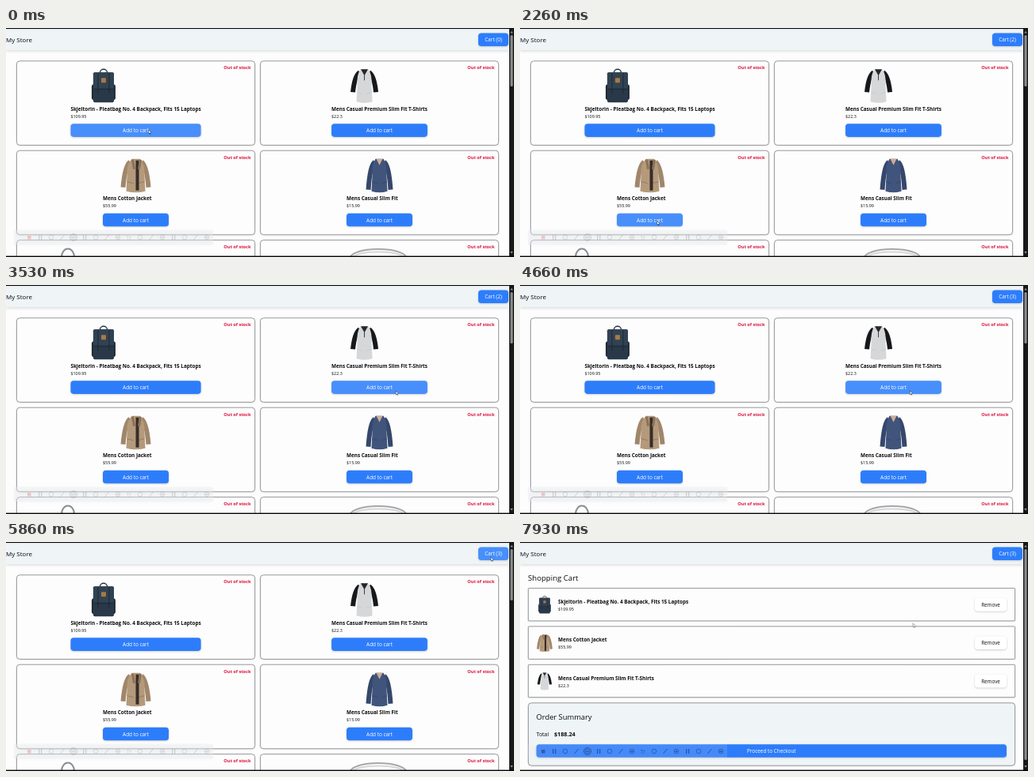
Write an HTML page with a canvas that moves like this. It is 640 by 290 pixels and loops after 8 s.

```html
<!DOCTYPE html>
<html lang="en">
<head>
<meta charset="utf-8">
<title>My Store</title>
<style>
html, body { margin: 0; width: 100%; height: 100%; overflow: hidden; background: #fdfdfd; }
canvas { display: block; width: 640px; height: 290px; }
</style>
</head>
<body>
<canvas id="stage"></canvas>
<script>
const LOOP = 8000;
const canvas = document.getElementById('stage');
const c = canvas.getContext('2d');
const dpr = Math.max(1, window.devicePixelRatio || 1);
canvas.width = 640 * dpr;
canvas.height = 290 * dpr;

const INK = '#0c0d0f', LINE = '#6c6f72', PALE = '#eff4f7', PAGE = '#fdfdfd';
const BLUE = '#2d7dfb', HOVER = '#488ffb', RED = '#dc1038';
const CLICKS = [660, 2260, 4060], CHECKOUT = 6260;

// the pointer rests, then glides to each place
const moves = [
  { from: 660, to: 1200, x: 179, y: 137.4 },
  { from: 1200, to: 1930, x: 172.5, y: 244.5 },
  { from: 2460, to: 3530, x: 491, y: 134 },
  { from: 4660, to: 5930, x: 614, y: 16 },
  { from: 6800, to: 7930, x: 495, y: 103 }
];

function pointerAt(t) {
  const p = { x: 179.5, y: 129, over: false };
  for (const m of moves) {
    const u = Math.min(1, Math.max(0, (t - m.from) / (m.to - m.from)));
    const e = 1 - (1 - u) ** 1.25;
    p.x += (m.x - p.x) * e;
    p.y += (m.y - p.y) * e;
  }
  return p;
}

function rect(x, y, w, h, fill) {
  c.fillStyle = fill;
  c.fillRect(x, y, w, h);
}

function box(x, y, w, h, r, fill, stroke, shadow) {
  c.save();
  c.beginPath();
  c.roundRect(x, y, w, h, r);
  if (shadow) {
    c.shadowColor = `rgba(0,0,0,${shadow})`;
    c.shadowBlur = 2.4 * dpr;
    c.shadowOffsetY = 0.8 * dpr;
  }
  c.fillStyle = fill;
  c.fill();
  c.restore();
  if (stroke) {
    c.strokeStyle = stroke;
    c.lineWidth = 0.7;
    c.stroke();
  }
}

function setFont(size, weight = 400) {
  c.font = `${weight} ${size}px "Open Sans", "Noto Sans", sans-serif`;
}

function text(s, x, y, size, color = INK, weight = 400, align = 'left') {
  setFont(size, weight);
  c.textAlign = align;
  c.fillStyle = color;
  c.fillText(s, x, y);
}

function line(color, w, ...p) {
  c.beginPath();
  for (let i = 0; i < p.length; i += 2) c.lineTo(p[i], p[i + 1]);
  c.strokeStyle = color;
  c.lineWidth = w;
  c.stroke();
}

function ring(x, y, rx, ry, color, w) {
  c.beginPath();
  c.ellipse(x, y, rx, ry, 0, 0, Math.PI * 2);
  c.strokeStyle = color;
  c.lineWidth = w;
  c.stroke();
}

// a triangle pointing up (h > 0) or down (h < 0)
function wedge(x, y, w, h, fill) {
  c.beginPath();
  c.moveTo(x, y);
  c.lineTo(x + w, y + h);
  c.lineTo(x - w, y + h);
  c.fillStyle = fill;
  c.fill();
}

function backpack() {
  ring(0, -17, 4.5, 4, '#26313f', 1.4);
  box(-15, -2, 30, 20, 3, '#1f2b38');
  box(-13, -17, 26, 38, 2, '#2a394a');
  box(-13, -17, 26, 20, 2, '#314253');
  for (const x of [-7, 7]) line('#1d2834', 1, x, -16, x, 10);
  rect(-12, 4, 24, 1, '#1d2834');
  box(-3, -10, 6, 6, 1, '#a87a45');
}

// sleeves are thick curves from the shoulders, the body tapers to a hem
function garment({ body, sleeve, half, reach, cuff, seam }) {
  c.lineCap = 'butt';
  for (const s of [-1, 1]) {
    c.beginPath();
    c.moveTo(s * half * 0.6, -17);
    c.quadraticCurveTo(s * reach * 0.85, -13, s * reach, cuff);
    c.strokeStyle = sleeve;
    c.lineWidth = 6;
    c.stroke();
  }
  c.beginPath();
  c.moveTo(-5, -21);
  c.lineTo(5, -21);
  c.quadraticCurveTo(half, -14, half - 1, 0);
  c.lineTo(half, 20);
  c.quadraticCurveTo(0, 23, -half, 20);
  c.lineTo(1 - half, 0);
  c.quadraticCurveTo(-half, -14, -5, -21);
  c.fillStyle = body;
  c.fill();
  for (const s of [-1, 1]) line(seam, 0.8, s * half * 0.9, 8, s * 3, 10);
}

function raglan() {
  garment({ body: '#d6d7d9', sleeve: '#17181b', half: 10, reach: 14.5, cuff: 8, seam: '#c6c7c9' });
  wedge(0, -13, 4.5, -8, '#26272b');
  line('#3a3c40', 1, 0, -14, 0, -7);
}

function jacket() {
  garment({ body: '#b49a7b', sleeve: '#a0866a', half: 12, reach: 16, cuff: 15, seam: '#8d7459' });
  line('#362c2a', 4, 2, -19, 2, 19);
  for (const s of [-1, 1]) line('#8b7258', 3, 1 + s * 5, -20, 1 + s * 3, -8);
}

function slimShirt() {
  garment({ body: '#40547c', sleeve: '#35476b', half: 10, reach: 14, cuff: 18, seam: '#344668' });
  wedge(0, -13, 4, -8, '#d0ad95');
}

const products = [
  { name: 'Skjeltorin - Pleatbag No. 4 Backpack, Fits 15 Laptops', price: '$109.95', art: backpack },
  { name: 'Mens Casual Premium Slim Fit T-Shirts', price: '$22.3', art: raglan },
  { name: 'Mens Cotton Jacket', price: '$55.99', art: jacket },
  { name: 'Mens Casual Slim Fit', price: '$15.99', art: slimShirt }
];

function label(item, x, y) {
  text(item.name, x, y, 6.35, INK, 700);
  text(item.price, x, y + 9.2, 5.4);
}

function picture(item, x, y, k) {
  c.save();
  c.translate(x, y);
  c.scale(k, k);
  item.art();
  c.restore();
}

function button(caption, x, y, w, p) {
  const h = 16.6;
  const over = p.x >= x && p.x <= x + w && p.y >= y && p.y <= y + h;
  p.over ||= over;
  box(x, y, w, h, 3.8, over ? HOVER : BLUE, null, 0.2);
  text(caption, x + w / 2, y + 10.8, 6.4, '#fff', 400, 'center');
}

function header(count, p) {
  c.save();
  c.shadowColor = 'rgba(0,0,0,.16)';
  c.shadowBlur = 4 * dpr;
  c.shadowOffsetY = dpr;
  rect(0, 0, 634, 28, PALE);
  c.restore();
  text('My Store', 0, 18, 8);
  button(`Cart (${count})`, 595, 6.4, 38, p);
}

// each card's column is as wide as its title, but never under 83
function store(p) {
  for (let i = 0; i < 6; i++) {
    const x = 13.4 + 307 * (i % 2), y = 41.8 + 113.4 * (i >> 1);
    box(x, y, 300.2, 106.6, 4, PAGE, LINE, 0.1);
    text('Out of stock', x + 295, y + 10.4, 5.6, RED, 700, 'right');
    const item = products[i];
    if (!item) continue;
    setFont(6.35, 700);
    const w = Math.max(83, c.measureText(item.name).width);
    const left = x + 150.1 - w / 2;
    picture(item, left + 41.5, y + 31.5, 1);
    label(item, left, y + 63);
    button('Add to cart', left, y + 79.5, w, p);
  }
  ring(78, 290, 8, 10.5, '#8d8f91', 2);
  ring(469, 291, 35, 11, '#a5a7a9', 2);
  ring(469, 291.5, 32, 8, '#d6d7d9', 2);
}

function cart(p) {
  text('Shopping Cart', 10, 48.7, 9.6);
  [0, 2, 1].forEach((id, i) => {
    const y = 58.5 + 48.4 * i;
    box(10.4, y, 613.2, 41.4, 0.8, PAGE, LINE, 0.1);
    picture(products[id], 31, y + 21, 0.52);
    label(products[id], 48, y + 19.2);
    box(573, y + 12.6, 40, 16.6, 3.8, '#fff', null, 0.2);
    text('Remove', 593, y + 23.3, 6.3, INK, 400, 'center');
  });
  box(10.4, 203.8, 613.2, 79.4, 4, PALE, LINE, 0.1);
  text('Order Summary', 20.5, 224.6, 9.35);
  text('Total', 20.5, 245.6, 7);
  text('$188.24', 43, 245.6, 7.2, INK, 700);
  button('Proceed to Checkout', 20.6, 256.2, 592.4, p);
}

// faint floating recorder bar with evenly spaced tools
function toolbar(inCart) {
  c.save();
  box(10, 255.5, 251, 19, 2, `rgba(235,238,242,${inCart ? 0.13 : 0.4})`, null, 0.08);
  c.globalAlpha = inCart ? 0.55 : 0.22;
  const ink = inCart ? '#0f2c62' : '#55585c', y = 265;
  for (let i = 0; i < 17; i++) {
    const x = 29 + 14 * i, kind = i % 4;
    if (i === 0) rect(x - 2, y - 2, 4.5, 4.5, inCart ? '#3a2b62' : '#e02626');
    else if (i === 9) text('Tr', x, y + 2.5, 7, ink, 400, 'center');
    else if (kind === 1) for (const d of [-2, 1]) rect(x + d, y - 3, 1.3, 6, ink);
    else if (kind === 3) line(ink, 1, x - 2.5, y + 3, x + 2.5, y - 3);
    else {
      ring(x, y, 2.8, 2.8, ink, 0.8);
      if (kind === 0) rect(x - 1.5, y - 0.5, 3, 1.5, ink);
    }
  }
  ring(85, y, 4.5, 4.5, ink, 1);
  c.restore();
}

function frameEdges(inCart) {
  rect(0, 0, 640, 1.1, '#050607');
  rect(634, 0, 6, 290, '#17181a');
  box(635.4, 9, 3.2, inCart ? 267 : 65, 1.5, '#8c8e90');
  wedge(637, 3.8, 1.8, 2.7, '#8c8e90');
  wedge(637, 285.7, 1.8, -2.7, '#8c8e90');
  rect(0, 288.6, 640, 1.4, '#050607');
}

function pointer({ x, y, over }) {
  c.save();
  c.translate(x, y);
  c.lineJoin = 'round';
  c.beginPath();
  c.moveTo(0, 0);
  c.lineTo(0.3, 4.8);
  c.lineTo(1.6, 3.9);
  c.lineTo(3.6, 3.4);
  c.closePath();
  c.fillStyle = '#fff';
  c.fill();
  line(over ? '#1c2433' : '#55575a', 0.8, 1.6, 3.9, 2.4, 5.6);
  c.beginPath();
  c.moveTo(0, 0);
  c.lineTo(0.3, 4.8);
  c.lineTo(3.6, 3.4);
  c.closePath();
  c.lineWidth = 0.5;
  c.stroke();
  c.restore();
}

function draw(t) {
  const p = pointerAt(t);
  const inCart = t >= CHECKOUT;
  const count = CLICKS.filter(click => t >= click).length;
  c.setTransform(dpr, 0, 0, dpr, 0, 0);
  rect(0, 0, 640, 290, PAGE);
  if (inCart) cart(p); else store(p);
  header(count, p);
  toolbar(inCart);
  frameEdges(inCart);
  pointer(p);
}

const start = performance.now();
function tick() {
  draw((performance.now() - start) % LOOP);
  requestAnimationFrame(tick);
}
tick();
</script>
</body>
</html>
```
